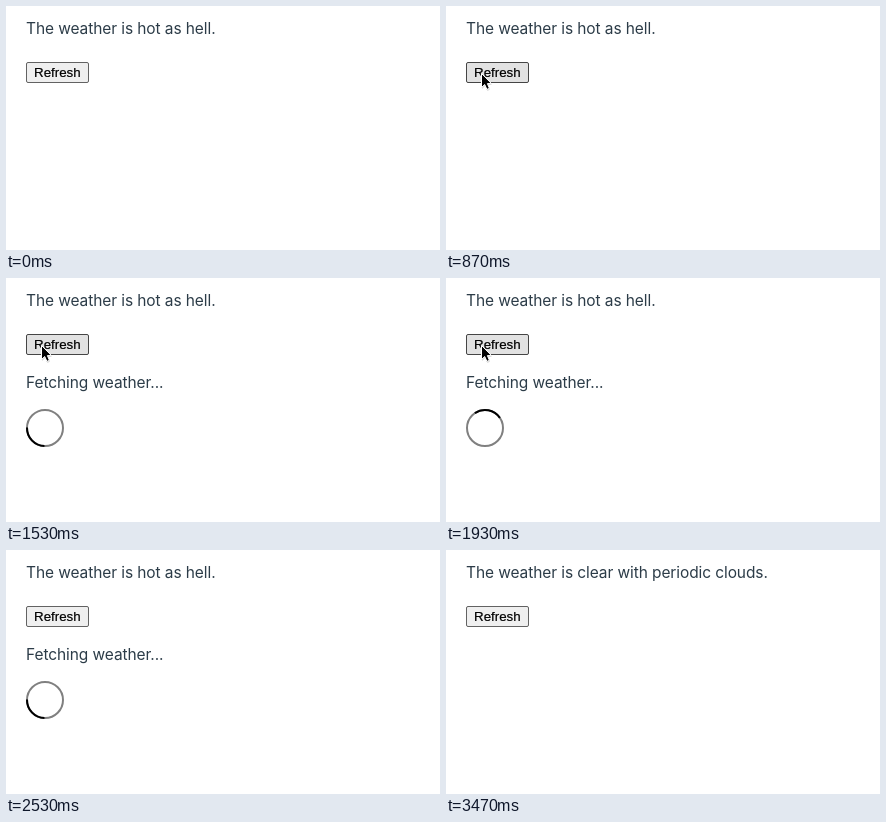
An HTML page for the animation above (4670 ms loop, 434 by 244 pixels).

```html
<!DOCTYPE html>
<html lang="en">
<head>
<meta charset="utf-8">
<title>Weather refresh</title>
<style>
  html, body { margin: 0; width: 100%; height: 100%; overflow: hidden; background: #fff; }
  svg { display: block; width: 434px; height: 244px; }
  .copy { font: 15.5px Inter, sans-serif; letter-spacing: -0.09px; fill: #2c3c48; }
  .label { font: 13.333px "Liberation Sans", Arial, sans-serif; stroke: #000; stroke-width: .2; }
  .ring { fill: none; stroke-width: 2; }
</style>
</head>
<body>
<svg viewBox="0 0 434 244">
  <text id="report" class="copy" x="20" y="28"></text>
  <rect id="button" x="20.5" y="56.5" width="62" height="20" rx="1.5"/>
  <text class="label" x="28" y="71">Refresh</text>
  <g id="loading">
    <text class="copy" x="20" y="110">Fetching weather...</text>
    <g class="ring" transform="translate(39 150)">
      <circle r="18" stroke="#808080"/>
      <path id="arc" d="M-12.73 -12.73A18 18 0 0 1 12.73 -12.73" stroke="#000"/>
    </g>
  </g>
  <g id="cursor">
    <path d="M0 0V14L3.2 11L5.4 15.9L7.9 14.8L5.9 10.1H10Z" fill="#000" opacity=".15" transform="translate(.5 1.5)"/>
    <path d="M0 0V14L3.2 11L5.4 15.9L7.9 14.8L5.9 10.1H10Z" stroke="#fff" stroke-width="1" stroke-linejoin="round"/>
  </g>
</svg>
<script>
const LOOP = 4670, STEP = 1000 / 15;
const PRESS = 1270, FETCH = 1400, LEAVE = 2130, DONE = 3470;

// time, x, y of the pointer tip
const path = [
  [330, 108, -7], [400, 84, 19], [470, 58, 41], [530, 37, 58],
  [600, 25.5, 65.5], [670, 26, 67], [800, 28, 68], [870, 35.5, 67.5]
];
const looks = {
  rest: ["#efefef", "#626262"],
  hover: ["#e2e2e2", "#454545"],
  active: ["#f5f5f5", "#7c7c7c"]
};
const [report, button, loading, arc, cursor] =
  ["report", "button", "loading", "arc", "cursor"].map(id => document.getElementById(id));

const show = (el, on) => el.setAttribute("visibility", on ? "visible" : "hidden");

// Snap to the 15 fps grid, with marks rounded to 10 ms
function snap(t) {
  const mark = n => Math.round(n * STEP / 10) * 10;
  const n = Math.floor(t / STEP) + 1;
  return [n, n - 1, n - 2].map(mark).find(m => m <= t) || 0;
}

function buttonState(t, x, y) {
  if (t >= PRESS && t < FETCH) return "active";
  const over = x >= 20 && x < 83 && y >= 56 && y < 77;
  return t >= path[0][0] && t < LEAVE && over ? "hover" : "rest";
}

function draw(now) {
  const t = snap(now % LOOP);
  const [, x, y] = path.filter(p => p[0] <= t).pop() || path[0];
  const [fill, edge] = looks[buttonState(t, x, y)];

  report.textContent = t < DONE
    ? "The weather is hot as hell."
    : "The weather is clear with periodic clouds.";
  button.setAttribute("fill", fill);
  button.setAttribute("stroke", edge);
  show(loading, t >= FETCH && t < DONE);
  arc.setAttribute("transform", `rotate(${180 + (t - FETCH) * 0.36})`);
  show(cursor, t >= path[0][0] && t < LEAVE);
  cursor.setAttribute("transform", `translate(${x} ${y})`);
}

const start = performance.now();
function tick() {
  draw(performance.now() - start);
  requestAnimationFrame(tick);
}
tick();
</script>
</body>
</html>
```
